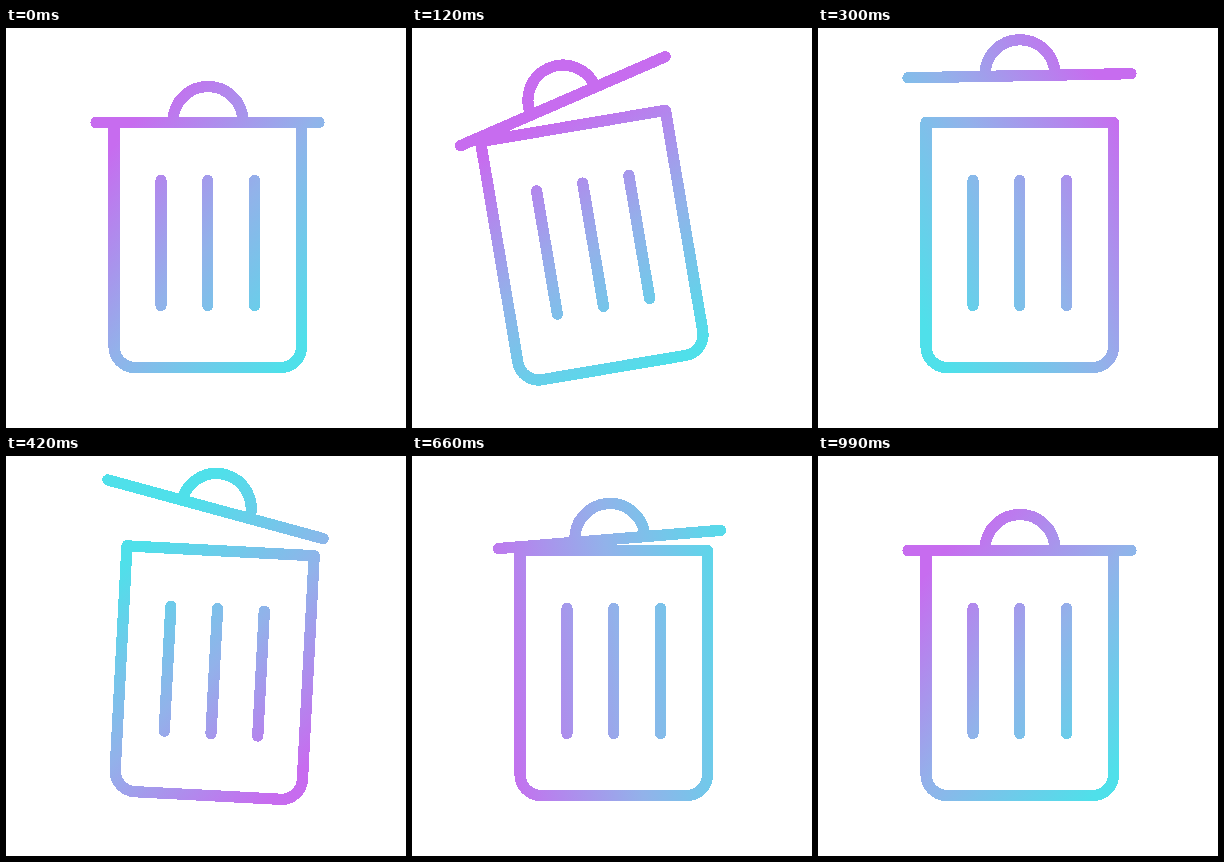
Animation, 400 px wide and 400 px high, one loop 3.02 s. Source, as an HTML page:

```html
<!DOCTYPE html>
<html lang="en">
<head>
<meta charset="utf-8">
<title>Trash can</title>
<style>
  html, body { margin: 0; width: 100%; height: 100%; overflow: hidden; background: #fff; }
  svg { display: block; width: 100vw; height: 100vh; }
</style>
</head>
<body>
<svg viewBox="0 0 400 400">
  <defs>
    <linearGradient id="tint" gradientUnits="userSpaceOnUse">
      <stop offset="0" stop-color="#c76cef"/>
      <stop offset="0.5" stop-color="#92b2ea"/>
      <stop offset="1" stop-color="#4fe0ea"/>
    </linearGradient>
    <mask id="can" maskUnits="userSpaceOnUse" x="0" y="0" width="400" height="400">
      <g id="body" fill="none" stroke="#fff" stroke-width="11.3" stroke-linecap="round" stroke-linejoin="round" shape-rendering="crispEdges">
        <path d="M108 94.5H295.5V318.5a21 21 0 0 1-21 21H129a21 21 0 0 1-21-21Z"/>
        <path d="M155 152.5V277.5M201.8 152.5V277.5M248.6 152.5V277.5"/>
        <g id="lid">
          <path d="M90 94.5H313"/>
          <path d="M167 93.5a35 35 0 0 1 70 0" stroke-linecap="butt"/>
        </g>
      </g>
    </mask>
  </defs>
  <rect width="400" height="400" fill="url(#tint)" mask="url(#can)"/>
</svg>
<script>
const LOOP = 3020, STEP = 30, MOTION_END = 990;
const [tint, body, lid] = ["tint", "body", "lid"].map(id => document.getElementById(id));

const progress = (time, from, to) => Math.min(1, Math.max(0, (time - from) / (to - from)));

// Smooth 0 to 1; a larger softness arrives earlier and settles longer.
const settle = (u, softness) => (1 - Math.cos(Math.PI * (1 - (1 - u) ** softness))) / 2;

// One swing out and back; a skew below 1 moves the peak forward.
const swing = (time, from, to, size, skew = 1) =>
  size * Math.sin(Math.PI * progress(time, from, to) ** skew);

const bodyTilt = time => swing(time, 0, 300, -9.6, 0.75) + swing(time, 300, 540, 3);

const lidTilt = time => swing(time, 0, 310, -13.9, 0.75) + swing(time, 310, 510, 12.4)
  + swing(time, 510, 720, -6) + swing(time, 720, MOTION_END, 1.4);

const lidShift = time => swing(time, 0, 300, -5.6, 0.75) + swing(time, 300, 850, -7, 0.5);

function lidLift(time) {
  const rise = Math.sin(Math.PI / 2 * progress(time, 0, 320));
  const fall = settle(progress(time, 320, MOTION_END), 1.6);
  return 47 * (rise - fall);
}

function turnTint(time) {
  const angle = 2 * Math.PI * (1 / 9 + settle(progress(time, 0, MOTION_END), 1.3));
  const dx = 136 * Math.cos(angle), dy = 136 * Math.sin(angle);
  const ends = { x1: 211 - dx, y1: 206 - dy, x2: 211 + dx, y2: 206 + dy };
  for (const name in ends) tint.setAttribute(name, ends[name]);
}

function draw(elapsed) {
  const time = Math.min(MOTION_END, Math.floor((elapsed % LOOP) / STEP + 0.01) * STEP);
  body.setAttribute("transform", `rotate(${bodyTilt(time)} 202 339)`);
  lid.setAttribute("transform",
    `translate(${lidShift(time)} ${-lidLift(time)}) rotate(${lidTilt(time)} 201.5 94.5)`);
  turnTint(time);
}

const start = performance.now();
function tick() {
  draw(performance.now() - start);
  requestAnimationFrame(tick);
}
tick();
</script>
</body>
</html>
```
